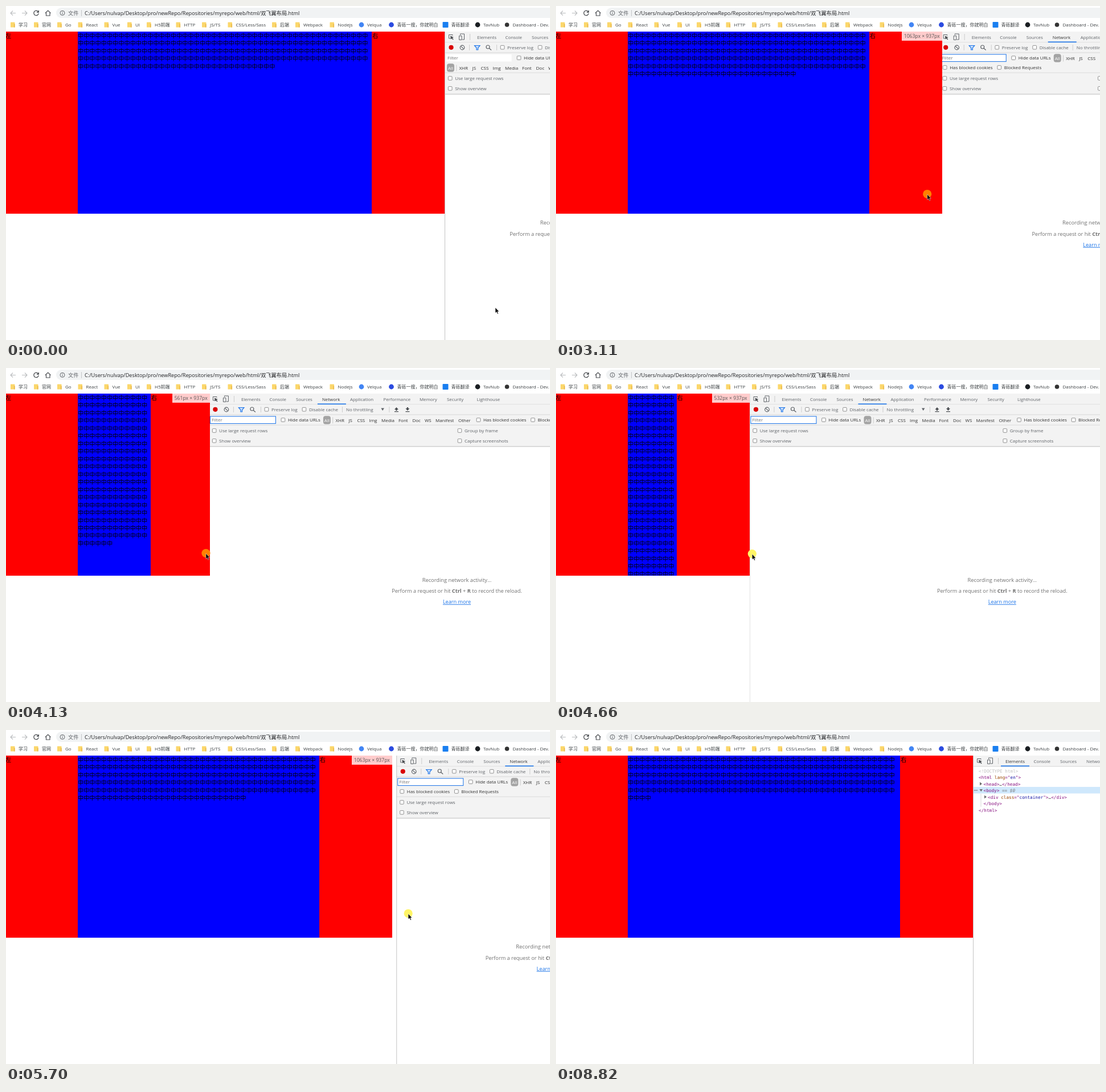
These frames come from a looping animation (955x587 px, 9680 ms). An HTML page:

```html
<!DOCTYPE html>
<html lang="zh-CN">
<head>
<meta charset="utf-8">
<title>双飞翼布局</title>
<style>
  html, body { margin: 0; width: 100%; height: 100%; overflow: hidden; background: #fff; }
  #stage { position: relative; width: 955px; height: 587px; overflow: hidden; }
  svg { position: absolute; inset: 0; width: 955px; height: 587px; }
  text { font-family: "Open Sans", "Noto Sans", "Noto Sans CJK SC", sans-serif; white-space: pre; }
  .mono text { font-family: "DejaVu Sans Mono", monospace; }
  #view { position: absolute; left: 0; top: 45px; height: 542px; overflow: hidden; background: #fff;
    font: 10.2px/13.47px "Noto Sans CJK SC", sans-serif; color: #000; }
  #wings { position: relative; height: 320px; background: #f00; }
  #wings div { position: absolute; top: 0; height: 320px; }
  #left { left: -1px; }
  #middle { left: 126px; right: 128px; background: #00f; overflow: hidden; word-break: break-all; }
  #right { right: 0; width: 127px; }
  #size { position: absolute; top: 0; right: 0; padding: 0 4px; height: 16px; background: #fcc; color: #555;
    font: 8.6px/16px "Open Sans", sans-serif; white-space: nowrap; }
</style>
</head>
<body>
<div id="stage">
  <svg id="ui"></svg>
  <div id="view">
    <div id="wings"><div id="left">左</div><div id="middle"></div><div id="right">右</div></div>
    <div id="size"></div>
  </div>
  <svg id="pointer">
    <circle id="halo" r="7.6" cy="-.5"/>
    <path id="arrow" d="M0 0V9.6L2.2 7.6 3.8 11.2 5.3 10.5 3.8 7.1H6.6Z" stroke="#fff" stroke-width=".5"/>
    <path id="resize" d="M-6 0L-3-3V-.6H3V-3L6 0 3 3V.6H-3V3Z" stroke="#fff" stroke-width=".4"/>
  </svg>
</div>
<script>
const LOOP = 9680, DRAG = 2690, TURN = 4400, DROP = 5950;
const LABEL_OFF = 6780, ELEMENTS = 6900, TREE_READY = 7085;
const RIGHT = 1227;   // devtools run past the stage to this x
const $ = id => document.getElementById(id);

function add(parent, tag, attrs = {}) {
  const node = document.createElementNS('http://www.w3.org/2000/svg', tag);
  for (const k in attrs) node.setAttribute(k, attrs[k]);
  parent.appendChild(node);
  return node;
}
const group = (parent, attrs) => add(parent, 'g', attrs);
const rect = (parent, x, y, width, height, fill, more) => add(parent, 'rect', { x, y, width, height, fill, ...more });
const line = (parent, d, stroke = '#5f6368', width = 1) =>
  add(parent, 'path', { d, stroke, 'stroke-width': width, fill: 'none' });
const dot = (parent, cx, cy, r, fill, more) => add(parent, 'circle', { cx, cy, r, fill, ...more });
// y is the middle of the capitals
function text(parent, x, y, str, size = 8, fill = '#5f6368', more) {
  const node = add(parent, 'text', { x, y: y + size * .36, 'font-size': size, fill, ...more });
  node.textContent = str;
  return node;
}
function check(parent, x, y, label, fill = '#5f6368') {
  rect(parent, x - 3.3, y - 3.6, 6.6, 6.6, '#fff', { rx: 1, stroke: '#767676', 'stroke-width': .8 });
  return text(parent, x + 8.5, y, label, 8, fill);
}
function spans(parent, x, y, size, parts, more) {
  const node = text(parent, x, y, '', size, '#881280', more);
  for (const [str, attrs] of parts) add(node, 'tspan', attrs).textContent = str;
  return node;
}

const ui = $('ui');

function buildBrowser() {
  const g = group(ui);
  rect(g, 88, 3, 900, 18, '#f1f3f4', { rx: 9 });
  line(g, 'M17 12.5H8M12 8.5L8 12.5 12 16.5M28 12.5H37M33 8.5L37 12.5 33 16.5', '#babcbe', 1.1);
  line(g, 'M56.5 10A4.2 4.2 0 1 0 57.2 13M57.3 7.8V11H54', '#4a4d51', 1.3);
  line(g, 'M69 12.5L73.7 8 78.4 12.5M70.5 12V17H77V12', '#4a4d51', 1.2);
  dot(g, 99, 12.3, 4, 'none', { stroke: '#5f6368' });
  line(g, 'M99 11.6V14.6M99 9.8V10.8');
  text(g, 109, 12.3, '文件', 9.2);
  line(g, 'M132.5 7V18', '#b8babd', .8);
  text(g, 138, 12.3, 'C:/Users/nulvap/Desktop/pro/newRepo/Repositories/myrepo/web/html/双飞翼布局.html', 9.2, '#202124');

  const folders = [[22, '学习'], [63, '官网'], [104, 'Go'], [140.5, 'React'], [186.5, 'Vue'], [227, 'UI'],
    [261, 'H5前端'], [312.5, 'HTTP'], [358, 'JS/TS'], [403.5, 'CSS/Less/Sass'], [481, '后端'],
    [522, 'Webpack'], [582.5, 'Nodejs']];
  for (const [x, name] of folders) {
    rect(g, x - 14, 28.5, 7.5, 9, '#fbd76c', { rx: .6 });
    rect(g, x - 8, 31.5, 1.6, 6, '#e9b84a');
    text(g, x, 33, name, 8, '#3c4043');
  }
  const sites = [[634, 'Velqua', '#4285f4'], [686.5, '青砾一搜，你就明白', '#2b4be0'], [781.5, '青砾翻译', '#1a7ff0'],
    [838, 'TavNub', '#1b1f23'], [889.5, 'Dashboard - Dev.', '#333']];
  sites.forEach(([x, name, fill], i) => {
    if (i == 2) rect(g, x - 15, 28, 10, 10, fill, { rx: 1 });
    else dot(g, x - 10, 33, i == 4 ? 3.8 : 4.4, fill);
    text(g, x, 33, name, 8, '#3c4043');
  });
}

buildBrowser();
const panel = group(ui);
rect(panel, 0, 45, 900, 542, '#fff');
rect(panel, 0, 45, 900, 19, '#f3f3f3');
line(panel, 'M0 64H900', '#ccc', .8);
const network = group(panel), elements = group(panel, { class: 'mono' });

// Tab strip
line(panel, 'M14 57H7.5V50.5H14V52', '#5f6368', 1);
add(panel, 'path', { d: 'M10 52.5L16 55 13.6 56 15.6 58.6 14.5 59.4 12.5 56.8 11 58.5Z', fill: '#4a4d51' });
line(panel, 'M27.5 51V49H34.5V59H31M25.5 52.5H30V59.5H25.5Z');
line(panel, 'M44.5 49V60', '#ccc');
const tabs = [[57, 'Elements'], [106.5, 'Console'], [153, 'Sources'], [199, 'Network'], [248, 'Application'],
  [306.5, 'Performance'], [370, 'Memory'], [418, 'Security'], [470.5, 'Lighthouse']]
  .map(([x, name]) => text(panel, x, 55, name, 7.9));
const underline = rect(panel, 0, 62.5, 50, 1.6, '#1a73e8');

// Network panel
const bars = rect(network, 0, 64.5, 900, 74, '#f3f3f3');
line(network, 'M0 82H900', '#d0d0d0', .8);
dot(network, 11.5, 72.8, 4.1, '#d90000');
dot(network, 31, 73, 3.8, 'none', { stroke: '#5f6368', 'stroke-width': 1.2 });
line(network, 'M28.3 70.3L33.7 75.7', '#5f6368', 1.2);
line(network, 'M43.5 68V78M91.5 68V78M234.5 68V78M317 68V78', '#ccc');
add(network, 'path', { d: 'M52.5 69.5H62L58.6 73.6V77H56V73.6Z', fill: '#cfe2fb', stroke: '#1a73e8', 'stroke-width': 1.2 });
dot(network, 76, 72, 3, 'none', { stroke: '#5f6368', 'stroke-width': 1.2 });
line(network, 'M78.2 74.2L82 77.5', '#5f6368', 1.3);
check(network, 101.5, 73, 'Preserve log');
check(network, 167.5, 73, 'Disable cache');
text(network, 241, 73, 'No throttling');
add(network, 'path', { d: 'M302.5 70.5H308L305.2 75Z', fill: '#5f6368' });
add(network, 'path', { d: 'M329.5 69L333 73H330.7V75H328.3V73H326ZM326 76H333V77.2H326ZM349 75L345.5 71H347.8V69H350.2V71H352.5ZM345.5 76H352.5V77.2H345.5Z', fill: '#4a4d51' });
const filter = rect(network, 2.5, 85, 115, 12.6, '#fff');
text(network, 5, 91.5, 'Filter', 8, '#757575');
check(network, 130.5, 91.5, 'Hide data URLs', '#333');

const types = group(network);
rect(types, 201, 84.3, 13, 14.5, '#a3a3a3', { rx: 4 });
text(types, 207.5, 92, 'All', 8, '#fff', { 'text-anchor': 'middle' });
line(types, 'M217.8 86.5V97.5', '#ccc');
[[222.5, 'XHR'], [245.5, 'JS'], [260.5, 'CSS'], [281.5, 'Img'], [303, 'Media'], [333, 'Font'], [357.5, 'Doc'],
  [379, 'WS'], [398, 'Manifest'], [438, 'Other']].forEach(([x, name]) => text(types, x, 92, name, 8, '#333'));
const cookies = group(network), requests = group(network);
check(cookies, 473.5, 91.5, 'Has blocked cookies', '#333');
check(requests, 569, 91.5, 'Blocked Requests', '#333');

const options = group(network);
line(options, 'M0 100.3H900', '#d6d6d6', .8);
line(options, 'M0 138H900', '#bdbdbd');
check(options, 9.7, 110.3, 'Use large request rows');
check(options, 9.7, 128.2, 'Show overview');
const secondColumn = group(options);
check(secondColumn, 5, 110.3, 'Group by frame');
check(secondColumn, 5, 128.2, 'Capture screenshots');

const message = group(network, { 'text-anchor': 'middle' });
text(message, 0, 372.3, 'Recording network activity…', 9.3, '#707070');
const bold = { 'font-weight': 700 };
spans(message, 0, 391.7, 9.2, [['Perform a request or hit '], ['Ctrl', bold], [' + '], ['R', bold],
  [' to record the reload.']]).setAttribute('fill', '#707070');
text(message, 0, 411, 'Learn more', 9.1, '#1a73e8', { 'text-decoration': 'underline' });

// Elements panel
const MONO = 7.7, attrName = { fill: '#994500' }, attrValue = { fill: '#1a1aa6' };
const faint = { fill: '#777' };
rect(elements, 0, 100, 900, 11.5, '#cfe8fc');
[3, 5.2, 7.4].forEach(x => dot(elements, x - .3, 106, .8, '#555'));
text(elements, 10, 72, '<!DOCTYPE html>', MONO, '#c0c0c0');
spans(elements, 10, 83.3, MONO, [['<html '], ['lang', attrName], ['="'], ['en', attrValue], ['">']]);
spans(elements, 18.5, 95, MONO, [['<head>'], ['…', { fill: '#333' }], ['</head>']]);
spans(elements, 18.5, 106.3, MONO, [['<body>'], [' == ', faint], ['$0', { ...faint, 'font-style': 'italic' }]]);
const closing = text(elements, 10, 127.4, '</html>', MONO, '#881280');
const tree = group(elements);
line(tree, 'M14 112V135', '#d0d0d0', .8);
add(tree, 'path', { d: 'M12 91.6L16 94.5 12 97.4ZM11.5 104H17L14.2 108.3ZM20 114.7L24 117.6 20 120.5Z', fill: '#6e6e6e' });
spans(tree, 26, 117.8, MONO, [['<div '], ['class', attrName], ['="'], ['container', attrValue], ['">'],
  ['…', { fill: '#333' }], ['</div>']]);
text(tree, 18.5, 129.5, '</body>', MONO, '#881280');
line(panel, 'M.5 45V587', '#c4c4c4');

$('middle').textContent = '中'.repeat(234);

// time, x, y
const pointerPath = [
  [0, 859, 530], [50, 859, 530], [200, 617, 401], [410, 617, 401], [650, 546, 365], [890, 597, 330], [1090, 597, 330],
  [1350, 949, 248], [1510, 906, 278], [1710, 906, 278], [2200, 776, 325], [2560, 771, 332], [2690, 771, 332],
  [3110, 652, 331], [3630, 505, 329], [4130, 351, 326], [4350, 335, 326], [4650, 342, 327], [4900, 395, 328],
  [5080, 479, 328], [5400, 615, 325], [5700, 706, 323], [5900, 734, 322], [6350, 745, 300], [6680, 803, 56],
  [6900, 803, 56], [7020, 796, 66], [7400, 745, 250], [7650, 736, 279], [7720, 736, 279], [7860, 732, 266],
  [7990, 737, 249], [8270, 737, 249], [8700, 890, 540], [8820, 912, 600]];
// time, devtools edge, viewport width, laid-out page width
const splitPath = [
  [2690, 770, 770, 770], [3110, 673, 678, 678], [3630, 520, 523, 535], [4130, 356, 357.8, 382],
  [4350, 338, 338, 340], [4650, 338, 338, 338], [4900, 372, 374, 374], [5080, 425, 429.8, 429.5],
  [5400, 585, 585, 580], [5700, 685, 677.5, 677.5], [5900, 732, 732, 732]];

function sample(path, t) {
  const i = path.findIndex(key => key[0] > t);
  if (i < 0) return path[path.length - 1].slice(1);
  if (i == 0) return path[0].slice(1);
  const a = path[i - 1], b = path[i], k = (t - a[0]) / (b[0] - a[0]);
  return a.slice(1).map((v, n) => v + (b[n + 1] - v) * k);
}
const move = (node, x, y) => node.setAttribute('transform', `translate(${x} ${y})`);
const show = (node, on) => { node.style.display = on ? '' : 'none'; };

function layoutNetwork(edge, focused) {
  const width = RIGHT - edge;
  const typesWrap = width < 465, cookiesWrap = width < 560, requestsWrap = width < 653;
  const drop = requestsWrap ? 17 : 0;
  move(types, typesWrap ? -197 : 0, typesWrap ? 17 : 0);
  move(cookies, typesWrap ? -190 : cookiesWrap ? -463.5 : 0, cookiesWrap ? 16.8 : 0);
  move(requests, typesWrap ? -190 : cookiesWrap ? -463.5 : requestsWrap ? -559 : 0, requestsWrap ? 16.8 : 0);
  move(options, 0, drop);
  move(secondColumn, width / 2, 0);
  move(message, width / 2, drop / 2);
  bars.setAttribute('height', 73.5 + drop);
  filter.setAttribute('stroke', focused ? '#1a73e8' : 'none');
}

function draw(now) {
  const t = now % LOOP;
  const [x, y] = sample(pointerPath, t);
  const [edge, view, layout] = sample(splitPath, t);
  const inElements = t >= ELEMENTS, dragging = t >= DRAG && t < DROP;

  move(panel, edge, 0);
  show(network, !inElements);
  show(elements, inElements);
  show(tree, t >= TREE_READY);
  closing.setAttribute('y', (t >= TREE_READY ? 141.2 : 127.4) + MONO * .36);
  layoutNetwork(edge, t >= DRAG);
  tabs.forEach((tab, i) => tab.setAttribute('fill', i == (inElements ? 0 : 3) ? '#333' : '#5f6368'));
  underline.setAttribute('x', inElements ? 49 : 191);

  $('view').style.width = view + 'px';
  $('wings').style.width = layout + 'px';
  $('size').textContent = `${Math.round(view / .6378)}px × 937px`;
  show($('size'), t >= DRAG && t < LABEL_OFF);

  const onEdge = !dragging && Math.abs(x - edge) < 3 && y > 200;
  ['halo', 'arrow', 'resize'].forEach(id => move($(id), x, y));
  show($('halo'), dragging);
  $('halo').setAttribute('fill', t < TURN ? '#ff8000' : '#fff566');
  show($('arrow'), !onEdge);
  show($('resize'), onEdge);
}

function tick() {
  draw(performance.now());
  requestAnimationFrame(tick);
}
tick();
</script>
</body>
</html>
```
